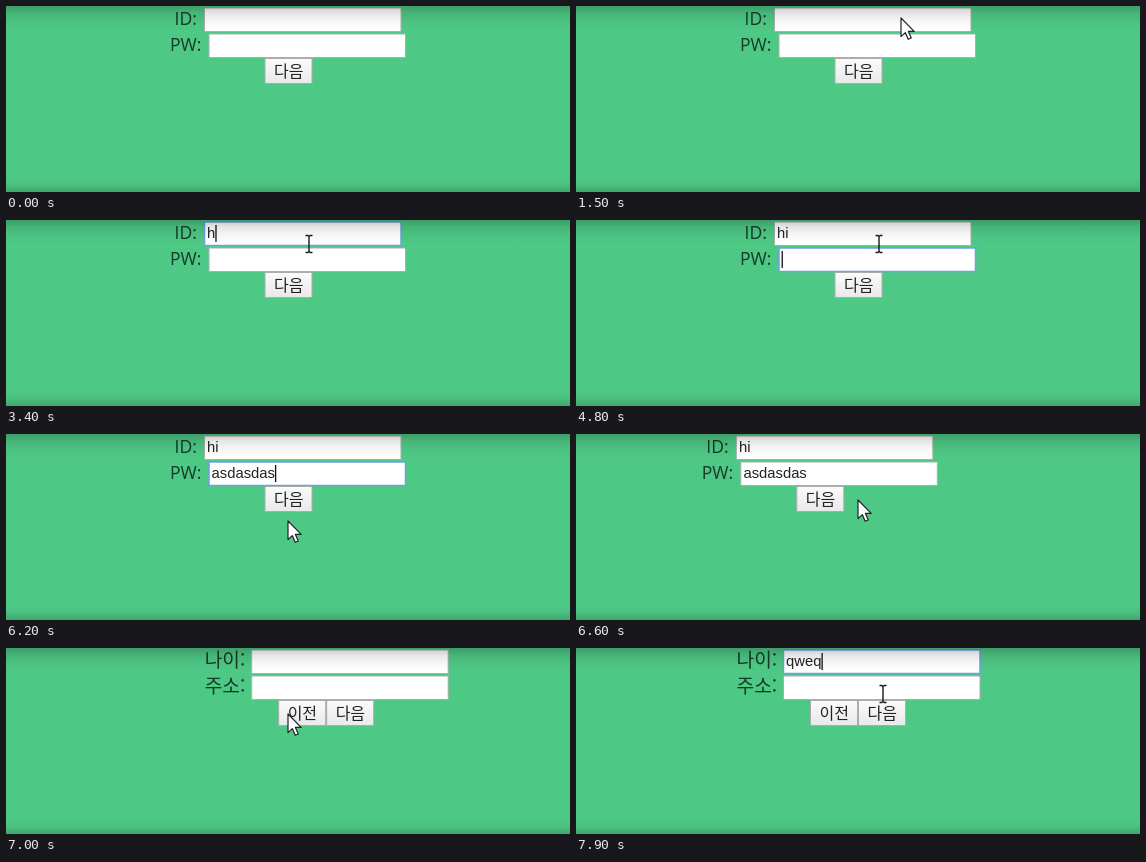
These frames come from a looping animation (564x186 px, 8000 ms). An HTML page:

```html
<!DOCTYPE html>
<html lang="ko">
<head>
<meta charset="utf-8">
<title>Sliding form</title>
<style>
  html, body { margin: 0; width: 100%; height: 100%; overflow: hidden; background: #4ec885; }
  svg { display: block; width: 564px; height: 186px; }
  .latin { font: 17.5px "Open Sans", "Noto Sans", sans-serif; fill: #153a27; }
  .hangul { font: 19.2px "Noto Sans CJK KR", "Noto Sans CJK", sans-serif; fill: #153a27; }
  .value { font: 14.8px "Liberation Sans", Arial, sans-serif; fill: #222; }
  .btn { font: 16px "Noto Sans CJK KR", "Noto Sans CJK", sans-serif; fill: #222; text-anchor: middle; }
  .box { fill: #fff; stroke: #a8b0ab; }
  .focus .box { stroke: #6f9fe4; stroke-width: 1.5; }
  .caret { fill: #111; visibility: hidden; }
</style>
</head>
<body>
<svg viewBox="0 0 564 186" id="stage">
  <defs>
    <linearGradient id="face" x2="0" y2="1">
      <stop stop-color="#fbfbfb"/><stop offset="1" stop-color="#e9e9e9"/>
    </linearGradient>
    <linearGradient id="top" x2="0" y2="1">
      <stop stop-opacity=".22"/><stop offset=".3" stop-opacity=".1"/>
      <stop offset=".65" stop-opacity=".03"/><stop offset="1" stop-opacity="0"/>
    </linearGradient>
    <linearGradient id="bottom" x2="0" y2="1">
      <stop stop-opacity="0"/><stop offset=".5" stop-opacity=".04"/><stop offset="1" stop-opacity=".17"/>
    </linearGradient>
  </defs>
  <rect width="564" height="186" fill="#4ec885"/>
  <g id="track"><g id="page1"></g><g id="page2" transform="translate(570)"></g></g>
  <rect width="564" height="24" fill="url(#top)"/>
  <rect y="171" width="564" height="15" fill="url(#bottom)"/>
  <g id="mouse">
    <path id="arrow" d="M0 0V18.6L4.3 14.6L7.2 21.3L10.3 20L7.4 13.4H13.2Z"
      fill="#fff" stroke="#222" stroke-width="1.2" stroke-linejoin="round"/>
    <path id="beam" d="M-3.5 -8.5H-1.2L0 -7.5L1.2 -8.5H3.5M0 -7.5V7.5M-3.5 8.5H-1.2L0 7.5L1.2 8.5H3.5"
      fill="none" stroke="#1a1a1a" stroke-width="1.4"/>
  </g>
</svg>
<script>
const LOOP = 8000, STEP = 100, SHIFT = 570;
const $ = id => document.getElementById(id);

function add(parent, tag, attrs, text = '') {
  const el = document.createElementNS('http://www.w3.org/2000/svg', tag);
  for (const k in attrs) el.setAttribute(k, attrs[k]);
  el.textContent = text;
  return parent.appendChild(el);
}

function field(page, label, kind, labelX, x, y) {
  add(page, 'text', { class: kind, x: labelX, y: y + 16.5 }, label);
  const g = add(page, 'g', {});
  add(g, 'rect', { class: 'box', x, y: y - .5, width: 196.5, height: 23.5 });
  const text = add(g, 'text', { class: 'value', x: x + 2.6, y: y + 15.8 });
  const caret = add(g, 'rect', { class: 'caret', y: y + 2.5, width: 1.3, height: 17 });
  return { g, text, caret, x: x + 2.6 };
}

function button(page, label, x) {
  add(page, 'rect', { x, y: 52.5, width: 47, height: 25, fill: 'url(#face)', stroke: '#a9aeab' });
  add(page, 'text', { class: 'btn', x: x + 23.7, y: 71.3 }, label);
}

const id = field($('page1'), 'ID:', 'latin', 168.5, 198.5, 2.5);
const pw = field($('page1'), 'PW:', 'latin', 164, 203, 28.5);
button($('page1'), '다음', 259);
const age = field($('page2'), '나이:', 'hangul', 160.5, 207.5, 2.5);
const address = field($('page2'), '주소:', 'hangul', 160.5, 207.5, 28.5);
button($('page2'), '이전', 234.5);
button($('page2'), '다음', 282.5);

// time, x, y
const path = [
  [100, 452, 172], [400, 372, 92], [700, 306, 34], [1000, 296, 16], [1300, 310, 10],
  [1500, 325, 12], [1800, 546, 57], [1900, 546, 56], [2200, 420, 34], [2600, 303, 24],
  [6000, 303, 24], [6200, 282, 87], [6400, 282, 66], [7100, 282, 66], [7400, 302, 15],
  [7600, 303, 17], [7900, 307, 46]
];
const idKeys = [3200, 4000];
const pwKeys = [...'asdasdas'].map((_, i) => 5000 + i * 100);
const ageKeys = [7600, 7700, 7800, 7900];

const ease = p => .5 - Math.cos(Math.PI * p) / 2;
const clamp = p => Math.min(1, Math.max(0, p));

function mouseAt(t) {
  const i = path.findIndex(p => p[0] > t);
  if (i < 0) return path[path.length - 1].slice(1);
  if (!i) return path[0].slice(1);
  const a = path[i - 1], b = path[i], p = ease((t - a[0]) / (b[0] - a[0]));
  return [a[1] + (b[1] - a[1]) * p, a[2] + (b[2] - a[2]) * p];
}

function setField(f, word, keys, t, from, to) {
  const typed = keys.filter(k => k <= t);
  const value = word.slice(0, typed.length);
  if (f.text.textContent !== value) f.text.textContent = value;
  const focused = t >= from && t < to;
  f.g.setAttribute('class', focused ? 'focus' : '');
  const last = typed.length ? typed[typed.length - 1] : from;
  const lit = focused && Math.floor((t - last) / 500) % 2 === 0;
  f.caret.style.visibility = lit ? 'visible' : 'hidden';
  f.caret.setAttribute('x', f.x + (value ? f.text.getComputedTextLength() : 0));
}

function draw(now) {
  const t = Math.floor(now % LOOP / STEP) * STEP;
  setField(id, 'hi', idKeys, t, 2800, 4800);
  setField(pw, 'asdasdas', pwKeys, t, 4800, 6500);
  if (t >= 6200 && t < 6500) pw.caret.style.visibility = 'visible';
  setField(age, 'qweq', ageKeys, t, 7500, LOOP);

  const slide = ease(clamp((t - 6500) / 600)) * SHIFT;
  $('track').setAttribute('transform', `translate(${-slide})`);

  const beam = t >= 2500 && t < 6100 || t >= 7400;
  $('mouse').setAttribute('transform', `translate(${mouseAt(t)})`);
  $('mouse').style.display = t < 100 ? 'none' : '';
  $('arrow').style.display = beam ? 'none' : '';
  $('beam').style.display = beam ? '' : 'none';
}

const start = performance.now();
function tick() {
  draw(performance.now() - start);
  requestAnimationFrame(tick);
}
tick();
</script>
</body>
</html>
```
